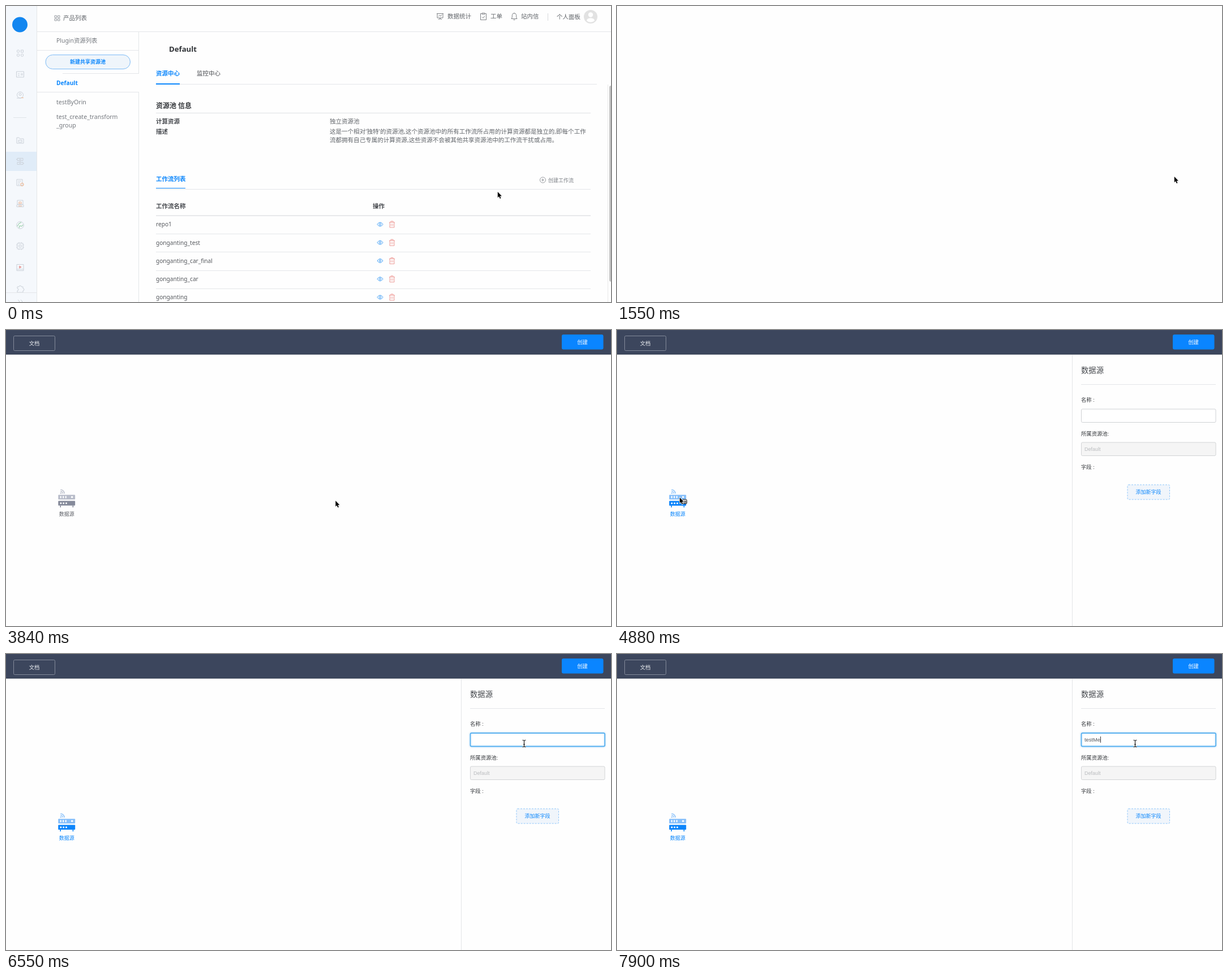
An HTML page with a canvas that plays this animation: 1069x524 px, repeating every 8000 ms.

```html
<!DOCTYPE html>
<html lang="zh-CN">
<head>
<meta charset="utf-8">
<title>创建工作流</title>
<style>
html, body { margin: 0; width: 100%; height: 100%; overflow: hidden; background: #fefefe; }
canvas { display: block; width: 100vw; height: 100vh; }
</style>
</head>
<body>
<canvas id="stage"></canvas>
<script>
const W = 1069, H = 524, LOOP = 8000;
const canvas = document.getElementById('stage');
const ctx = canvas.getContext('2d');
const dpr = window.devicePixelRatio || 1;
canvas.width = Math.round(W * dpr);
canvas.height = Math.round(H * dpr);

const CJK = '"Noto Sans CJK SC", "Noto Sans CJK", "Noto Sans CJK JP", sans-serif';
const NOTO = '"Noto Sans", ' + CJK;
const ARIAL = '"Liberation Sans", ' + CJK;
const BLUE = '#0a86fc', INK = '#46494e', GREY = '#606469', LINE = '#e4e6e9', ICON = '#cbd1d9';
let family = NOTO;

// Text is placed by its left (or middle) x and its visual centre y.
function text(str, x, y, size, color, weight = 400, align = 'left') {
  ctx.font = `${weight} ${size}px ${family}`;
  ctx.textAlign = align;
  ctx.fillStyle = color;
  ctx.fillText(str, x, y + size * 0.37);
}
function rect(x, y, w, h, color) {
  ctx.fillStyle = color;
  ctx.fillRect(x, y, w, h);
}
function box(x, y, w, h, r, fill, stroke, lw = 1) {
  ctx.beginPath();
  ctx.roundRect(x, y, w, h, r);
  if (fill) { ctx.fillStyle = fill; ctx.fill(); }
  if (stroke) { ctx.strokeStyle = stroke; ctx.lineWidth = lw; ctx.stroke(); }
}
function disc(x, y, r, color) {
  ctx.beginPath();
  ctx.arc(x, y, r, 0, 7);
  ctx.fillStyle = color;
  ctx.fill();
}
function path(d, x, y, stroke, lw = 1, fill) {
  const p = new Path2D(d);
  ctx.save();
  ctx.translate(x, y);
  ctx.lineJoin = 'round';
  if (fill) { ctx.fillStyle = fill; ctx.fill(p); }
  if (stroke) { ctx.strokeStyle = stroke; ctx.lineWidth = lw; ctx.stroke(p); }
  ctx.restore();
}
const ring = (x, y, r) => `M${x + r} ${y}A${r} ${r} 0 1 1 ${x - r} ${y}A${r} ${r} 0 1 1 ${x + r} ${y}`;

const SQUARES = 'M-4.5-4.5h3.5v3.5h-3.5zM1-4.5h3.5v3.5h-3.5zM-4.5 1h3.5v3.5h-3.5zM1 1h3.5v3.5h-3.5z';
const SIDE_ICONS = [
  [83, ring(-3.5, -3, 2.2) + 'M1.5-5h4v4h-4z' + ring(-3.5, 4, 2.2) + ring(3.5, 4, 2.2)],
  [121, 'M-6.5-5h13v10h-13zM-4-1h3M-4 2h3M2-2v4M4-2v4'],
  [158, ring(0, -.5, 5.5) + ring(0, -1.5, 2) + 'M-6 5h8', 'M2 4.5h4', '#efb48c'],
  [238, 'M-6-5h4l1.5 2h6.5v8h-12zM-3-.5h6v3.5h-6z'],
  [275, 'M-5-5.5h10v4h-10zM-5 1.5h10v4h-10zM-7-3.5h2M5 3.5h2M0-1.5v3M-2-3.5h4M-2 3.5h4'],
  [313, 'M-6-6h10v11h-10zM-4-3h6M-4 0h4M-4 3h3', ring(3.5, 3, 2.6), '#f0ab7c'],
  [350, 'M-5-6h10v7h-10zM-6 2h12v3.5h-12z', 'M-2-3h4v3h-4zM-3 4h6', '#f0b592'],
  [388, ring(0, 0, 6.3), 'M-5 2l3-5 4-2M-2 5l1-4 4 1 2-3', '#86c99a'],
  [425, 'M-5-5h10v10h-10zM-2-2h4v4h-4zM-2-7v2M2-7v2M-2 5v2M2 5v2M-7-2h2M-7 2h2M5-2h2M5 2h2'],
  [463, 'M-6-5.5h12v11h-12zM-6 3h12', 'M-1.2-2.6l3 1.8-3 1.8z', '#e5716c'],
  [500, 'M-5-3h3a2 2 0 1 1 4 0h3v3a2 2 0 1 1 0 4v3h-10v-3a2 2 0 1 0 0-4z'],
  [523, 'M-4-3l3 3-3 3M1-3l3 3-3 3']
];

function sidebar() {
  rect(0, 0, 54, H, '#f5f8fc');
  rect(54, 0, 1, H, LINE);
  rect(0, 258, 54, 34, '#e0ecf8');
  disc(24.5, 33, 13.5, '#1286f0');
  rect(13, 197, 23, 1, '#e0e4e8');
  for (const [y, d, accent, color] of SIDE_ICONS) {
    path(d, 25, y, ICON);
    if (accent) path(accent, 25, y, color);
  }
  rect(0, 507, 54, 1, LINE);
}

function topBar() {
  rect(55, 45, W - 55, 1, LINE);
  path(SQUARES, 90.5, 21.5, '#8b9097', 0.9);
  text('产品列表', 101, 21.5, 10.5, GREY);
  path('M-6-5h12M-5-5v7.5h10v-7.5M-3 0l2-2 2 1.5 2-2.5M0 2.5v2M-3 5.5l3-1.5 3 1.5', 767, 18.5, GREY, 0.8);
  text('数据统计', 780, 18.5, 10.5, GREY);
  path('M-3-5h-2v11h10v-11h-2M-2.5-6h5v2h-5zM-2.5 1l2 2 3-4', 843.5, 18.5, GREY, 0.8);
  text('工单', 856, 18.5, 10.5, GREY);
  path('M-5 4c2-2 1-5 1.5-7a3.6 3.6 0 0 1 7 0c.5 2-.5 5 1.5 7zM-1.5 6h3M0-6.5v1', 898, 18.5, GREY, 0.8);
  text('站内信', 910, 18.5, 10.5, GREY);
  rect(957, 13, 1, 13, '#d8dadd');
  text('个人面板', 973, 19.5, 10.5, GREY);
  disc(1033, 19, 12, '#e2e2e2');
  disc(1033, 15.5, 4.2, '#fff');
  path('M-7 7c.5-3.6 4-4.4 7-4.4s6.500.8 7 4.4a10 10 0 0 1-14 0z', 1033, 19, null, 1, '#fff');
}

function poolList() {
  rect(234, 46, 1, 74, LINE);
  rect(234, 153, 1, H - 153, LINE);
  rect(55, 78, 180, 1, LINE);
  rect(100, 119, 135, 1, LINE);
  rect(55, 152, 180, 1, LINE);
  text('Plugin资源列表', 89, 61, 10.4, '#74787e');
  box(70, 86.5, 149.5, 25, 12.5, '#eff5fb', '#7dbbf6');
  text('新建共享资源池', 144.5, 99, 9, BLUE, 600, 'center');
  text('Default', 89, 136, 10.2, BLUE, 600);
  text('testByOrin', 89, 170, 10.6, '#74787e');
  text('test_create_transform', 89, 196.5, 10.55, '#74787e');
  text('_group', 89, 211.5, 10.55, '#74787e');
}

const FLOWS = ['repo1', 'gonganting_test', 'gonganting_car_final', 'gonganting_car', 'gonganting'];

function poolPage(hover) {
  family = NOTO;
  sidebar();
  topBar();
  poolList();
  text('Default', 288, 76.5, 13.2, '#2f3236', 600);
  text('资源中心', 265, 119.5, 10.5, BLUE, 600);
  text('监控中心', 337, 119.5, 10.5, INK);
  rect(265, 138, 779, 1, LINE);
  rect(265, 137, 42, 2, BLUE);

  text('资源池 信息', 265, 176.7, 12, '#33363a', 600);
  rect(265, 189, 768, 1, '#dfe1e4');
  text('计算资源', 265, 204.5, 10.5, INK, 600);
  text('描述', 265, 222.5, 10.5, INK, 600);
  text('独立资源池', 572, 204.5, 10.5, GREY);
  text("这是一个相对'独特'的资源池,这个资源池中的所有工作流所占用的计算资源都是独立的,即每个工作", 572, 222.5, 10.54, GREY);
  text('流都拥有自己专属的计算资源,这些资源不会被其他共享资源池中的工作流干扰或占用。', 572, 237.5, 10.54, GREY);

  text('工作流列表', 265, 306.6, 10.5, BLUE, 600);
  rect(265, 324, 768, 1, LINE);
  rect(265, 322, 52, 1, BLUE);
  const link = hover ? BLUE : '#7d8187';
  path(ring(0, 0, 5) + 'M-2.5 0h5M0-2.5v5', 948.5, 308, link, 0.8);
  text('创建工作流', 958, 308.5, 9, link);

  text('工作流名称', 265, 354.5, 10.5, INK, 600);
  text('操作', 648, 354.5, 10.5, INK, 600);
  rect(265, 370.5, 768, 1.3, '#dcdee1');
  FLOWS.forEach((name, i) => {
    const y = 386.5 + i * 32.25;
    text(name, 265, y, 10.15, '#56595e');
    path('M-5 0q5-7 10 0q-5 7-10 0z' + ring(0, 0, 1.6), 661, y, '#3f9df5');
    path('M-5-3.5h10M-2-3.5v-2h4v2M-4-3.5v9h8v-9M-1.5-1v4M1.5-1v4', 682, y, '#ec918d', 0.9);
    rect(265, Math.round(y + 16.7), 768, 1, LINE);
  });
  rect(1063, 139, 1, H - 139, '#e8e8e8');
  box(1066, 141, 6, 347, 3, '#c2c2c2');
}

function editorBar() {
  rect(0, 0, W, 43, '#3c465d');
  rect(0, 42.5, W, 1, '#2d364b');
  box(13.5, 10.5, 73, 26, 2, null, '#838a9a');
  text('文档', 50, 23.5, 9.33, '#eceef2', 400, 'center');
  box(982, 8, 73.5, 26.5, 3, '#0a85ff');
  text('创建', 1018.5, 21.3, 9.33, '#fff', 500, 'center');
}

function sourceNode(x, y, scale, active) {
  const top = active ? '#86bffa' : '#b9bdca', low = active ? '#0d85fb' : '#858a9a';
  ctx.save();
  ctx.translate(x, y);
  ctx.scale(scale, scale);
  disc(-10.2, -9.4, 1.2, top);
  path('M-11-12.6a4.2 4.2 0 0 1 4.2 4.2M-11-15.4a7 7 0 0 1 7 7', 0, 0, top, 1.4);
  box(-15, -6.3, 30, 8.2, 1, top);
  box(-15, 4.5, 30, 8.4, 1, low);
  for (const i of [0, 1, 2]) {
    rect(-11.5 + i * 4.5, -4.2, 2, 4, '#fff');
    disc(-10.3 + i * 4.8, 8.7, 1.5, '#fff');
  }
  disc(9.5, -2.2, 1.8, '#fff');
  rect(-11.8, 12.5, 1.6, 3.6, low);
  rect(10.4, 12.5, 1.6, 3.6, low);
  text('数据源', 0, 27.5, 9, active ? BLUE : '#5c5f66', 400, 'center');
  ctx.restore();
}

function panel(focus, typed, caret) {
  rect(804, 44, 1, H - 44, '#e3e5e8');
  text('数据源', 820, 71.5, 13.33, '#45484d');
  rect(820, 96, 238, 1, '#e3e5e8');
  text('名称 :', 820, 124, 9.33, '#33363a');
  box(820.5, 140, 237.5, 23.5, 2, '#fff', '#cfd1d4');
  if (focus) {
    ctx.save();
    ctx.globalAlpha = focus;
    ctx.shadowColor = 'rgba(60,160,240,.5)';
    ctx.shadowBlur = 3 * dpr;
    box(820.5, 140, 237.5, 23.5, 2, '#fff', '#45a9ee', 1.4);
    ctx.restore();
  }
  text(typed, 826, 152, 9.33, '#55585d');
  if (caret) rect(826 + (typed ? ctx.measureText(typed).width : 0), 146, 0.9, 11, '#222');
  text('所属资源池:', 820, 183.5, 9.33, '#33363a');
  box(820.5, 199, 237.5, 23.5, 2, '#f5f5f5', '#d2d4d6');
  text('Default', 826, 211, 9, '#b9bbbe');
  text('字段 :', 820, 242.5, 9.33, '#33363a');
  ctx.setLineDash([3, 2]);
  box(902, 274, 74.5, 26, 2, '#f0f5fb', '#8fc6fa');
  ctx.setLineDash([]);
  text('添加新字段', 939, 287, 9, BLUE, 500, 'center');
}

const ARROW = 'M0 0v10.2l2.3-2.1 1.7 3.900 1.700-.8-1.700-3.700h3.200z';
const HAND = 'M-1.2 0q1.2-1.4 2.4 0v4.6q4-.6 5.8 1.2v3q0 2-1.2 4.6h-6q-1.2-2.4-3.8-4.8-.4-1.6 1.2-1.4l1.6 1z';
const cursors = {
  arrow(x, y) { path(ARROW, x, y, '#fff', 1.6); path(ARROW, x, y, null, 1, '#000'); },
  hand(x, y) { path(HAND, x, y, '#000', 1, '#fff'); },
  grab(x, y) {
    box(x + 4, y + 3.5, 8.5, 7.5, 1.5, '#fff', '#000');
    for (let i = 0; i < 3; i++) rect(x + 6 + i * 2, y + 5.5, 1, 4.5, '#000');
    cursors.arrow(x, y);
  },
  beam(x, y) {
    const d = 'M-3 0q3 0 3 1.5q0-1.5 3-1.5M0 1.5v9M-3 12q3 0 3-1.5q0 1.5 3 1.5M-1.5 7.5h3';
    path(d, x, y, '#fff', 2.4);
    path(d, x, y, '#111', 1.1);
  }
};

const lerp = (a, b, k) => a + (b - a) * k;
const easeIn = k => k ** 1.4;
const easeOut = k => 1 - (1 - k) ** 2;
const easeBoth = k => k * k * (3 - 2 * k);
const elastic = k => k <= 0 ? 0 : k >= 1 ? 1 : 2 ** (-10 * k) * Math.sin((k - 0.1) * Math.PI * 5) + 1;

// Each move: first step, last step, step count, target, easing.
const MOVES = [
  [150, 510, 3, 984.8, 302, easeOut],
  [3380, 3840, 4, 582.3, 302.3, easeIn],
  [3990, 4580, 5, 110.8, 296.5, easeOut],
  [5030, 5800, 6, 915.5, 152.5, easeBoth]
];
function pointer(t) {
  let x = 868.8, y = 329;
  for (const [from, to, n, tx, ty, ease] of MOVES) {
    if (t < from) break;
    const step = Math.floor((t - from) / (to - from) * (n - 1) + 1e-6) + 1;
    const k = ease(Math.min(1, step / n));
    x = lerp(x, tx, k);
    y = lerp(y, ty, k);
  }
  return [x, y];
}
function pointerKind(t) {
  if (t >= 5800) return 'beam';
  if (t >= 4580 && t < 5030) return 'grab';
  if (t >= 510 && t < 960) return 'hand';
  return t >= 960 && t < 1550 ? null : 'arrow';
}

const KEYS = [[6850, 't'], [7000, 'te'], [7150, 'test'], [7600, 'testM'], [7900, 'testMe']];

function editorPage(t) {
  family = ARIAL;
  editorBar();
  const k = Math.floor((t - 2930) / 152) * 0.152;
  const slide = easeOut(Math.min(1, k / 0.4));
  if (k <= 0) rect(128, 301, 1, 1, '#c4c7d0');
  else sourceNode(lerp(128, 107.2, slide), lerp(301, 298, slide), elastic(k), t >= 4880);
  if (t < 4880) return;
  const focus = t < 5950 ? 0 : Math.min(1, (Math.floor((t - 5950) / 150) + 1) / 3);
  const typed = KEYS.reduce((s, [at, str]) => t >= at ? str : s, '');
  panel(focus, typed, t >= 6100 && (t < 6550 || t >= 6850));
}

function draw(t) {
  ctx.setTransform(canvas.width / W, 0, 0, canvas.height / H, 0, 0);
  rect(0, 0, W, H, '#fefefe');
  if (t < 960) poolPage(t >= 510);
  else if (t >= 2930) editorPage(t);
  const kind = pointerKind(t);
  if (kind) cursors[kind](...pointer(t));
}

const start = performance.now();
function frame() {
  draw((performance.now() - start) % LOOP);
  requestAnimationFrame(frame);
}
frame();
</script>
</body>
</html>
```
